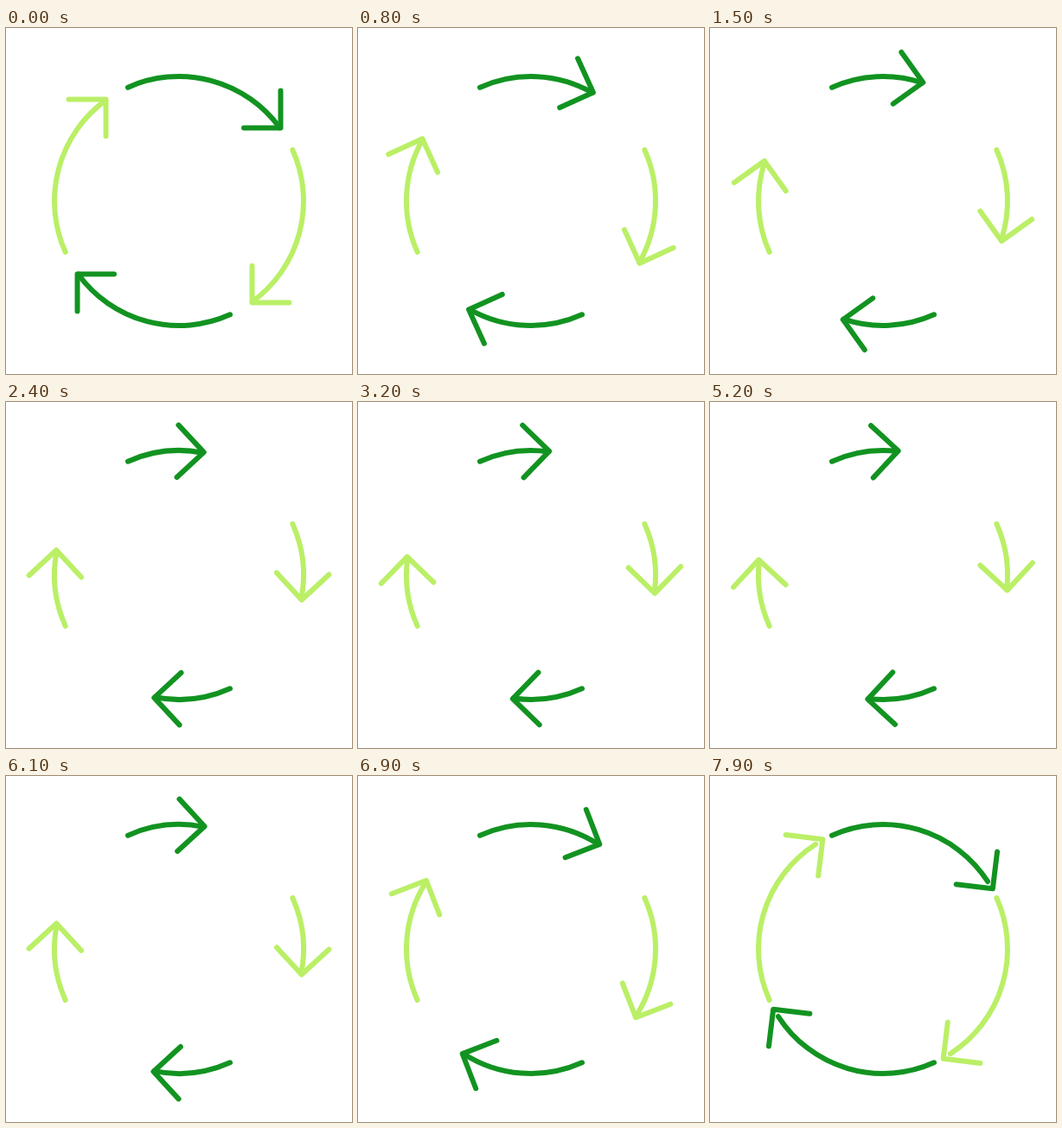
These frames come from a looping animation (400x400 px, 8000 ms). An HTML page:

```html
<!DOCTYPE html>
<html lang="en">
<head>
<meta charset="utf-8">
<title>Cycle arrows</title>
<style>
  html, body { margin: 0; width: 100%; height: 100%; overflow: hidden; background: #fff; }
  svg { display: block; width: 100vw; height: 100vh; }
  path { fill: none; stroke-width: 6; stroke-linecap: round; stroke-linejoin: round; }
</style>
</head>
<body>
<svg viewBox="-200 -200 400 400"></svg>
<script>
const LOOP = 8000, STEP = 100;
const RADIUS = 144, TAIL = -24.2, REST = 54.28, ARC_LIMIT = 57.2;
const COLORS = ['#129321', '#baef66'];
const svg = document.querySelector('svg');

function add(parent, name, attrs) {
  const el = document.createElementNS(svg.namespaceURI, name);
  for (const key in attrs) el.setAttribute(key, attrs[key]);
  return parent.appendChild(el);
}

const arrows = [0, 1, 2, 3].map(i => {
  const group = add(svg, 'g', { transform: `rotate(${i * 90})`, stroke: COLORS[i % 2] });
  return {
    arc: add(group, 'path', {}),
    head: add(group, 'path', { d: 'M117.5 -127.5V-84.5H75' })
  };
});

// Degrees clockwise from the top
function point(deg) {
  const a = deg * Math.PI / 180;
  return `${RADIUS * Math.sin(a)} ${-RADIUS * Math.cos(a)}`;
}

// Exponential ease in and out around a midpoint
function surge(t, mid, half) {
  const k = 2 ** (-Math.abs(t - mid) / half);
  return t < mid ? k : 2 - k;
}

function tipAngle(t) {
  return 5.31 + 48.97 * 2 ** (-t / 800) + 30.5 * surge(t, 6950, 370);
}

function draw(now) {
  const t = Math.floor(now % LOOP / STEP) * STEP;
  const tip = tipAngle(t);
  const end = Math.min(tip - 0.3, ARC_LIMIT);
  for (const { arc, head } of arrows) {
    arc.setAttribute('d', `M${point(TAIL)}A${RADIUS} ${RADIUS} 0 0 1 ${point(end)}`);
    head.setAttribute('transform', `rotate(${tip - REST})`);
  }
}

const start = performance.now();
function tick() {
  draw(performance.now() - start);
  requestAnimationFrame(tick);
}
tick();
</script>
</body>
</html>
```
